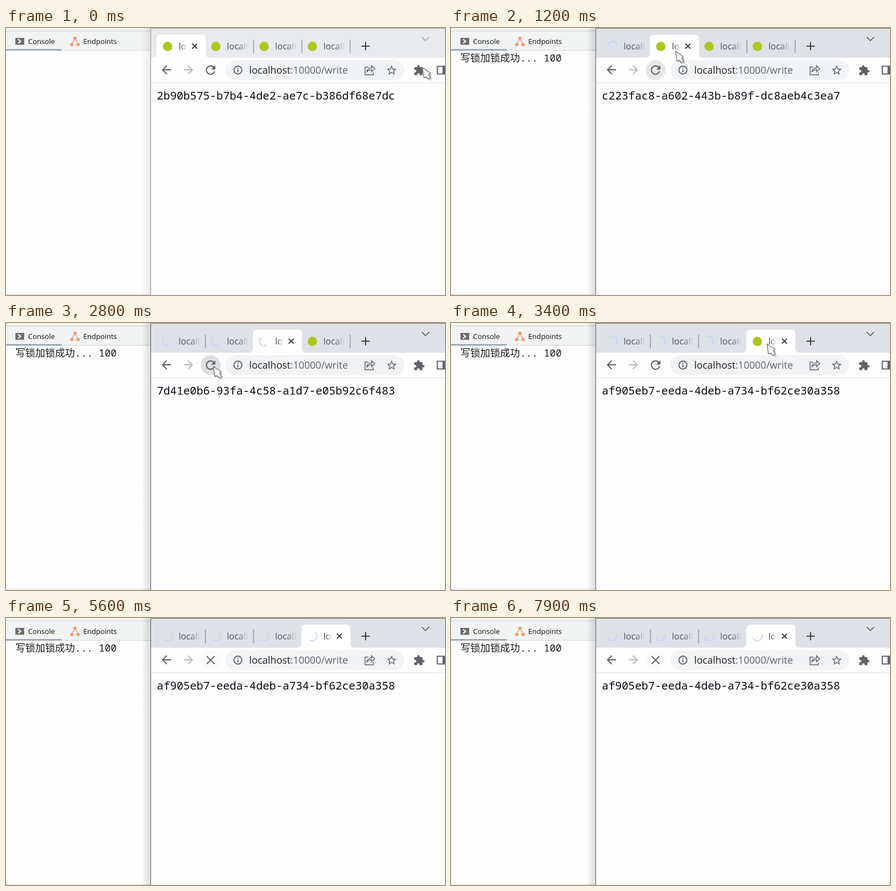
These frames come from a looping animation (796x485 px, 8000 ms). An HTML page:

```html
<!DOCTYPE html>
<html lang="en">
<head>
<meta charset="utf-8">
<style>
html, body { margin: 0; width: 100%; height: 100%; overflow: hidden; background: #fff; }
svg { display: block; width: 796px; height: 485px; }
text { white-space: pre; }
.ui { font: 13px "Open Sans", "Noto Sans", sans-serif; fill: #111; }
.log { font: 18px "Noto Sans Mono", "Noto Sans CJK SC", monospace; fill: #1a1a1a; }
.han { font: 300 18px "Noto Sans CJK SC", sans-serif; fill: #1a1a1a; }
.tab { font: 16px "Open Sans", "Noto Sans", sans-serif; }
.url { font: 17.85px "Open Sans", "Noto Sans", sans-serif; fill: #202124; }
.page { font: 20px "Noto Sans Mono", monospace; fill: #0b0b14; }
.line { fill: none; stroke: #5f6368; stroke-width: 2; }
.icon { fill: #5f6368; }
</style>
</head>
<body>
<svg viewBox="0 0 796 485">
  <defs>
    <linearGradient id="fadeLong" gradientUnits="userSpaceOnUse" x1="313" x2="352" y1="0" y2="0">
      <stop offset=".55" stop-color="#4f5358"/><stop offset="1" stop-color="#4f5358" stop-opacity="0"/>
    </linearGradient>
    <linearGradient id="fadeShort" gradientUnits="userSpaceOnUse" x1="313" x2="328" y1="0" y2="0">
      <stop offset=".3" stop-color="#3c4043"/><stop offset="1" stop-color="#3c4043" stop-opacity="0"/>
    </linearGradient>
    <linearGradient id="shade">
      <stop stop-color="#000" stop-opacity="0"/><stop offset="1" stop-color="#000" stop-opacity=".14"/>
    </linearGradient>
    <path id="back" d="M20 11H7.83l5.59-5.59L12 4l-8 8 8 8 1.41-1.41L7.83 13H20z"/>
  </defs>

  <!-- console pane -->
  <rect width="263" height="485" fill="#fefefe"/>
  <rect width="263" height="40" fill="#f2f4f4"/>
  <path d="M0 5.5H262M0 40.5H262M0 484.5H262" stroke="#cfd1d2"/>
  <rect y="38.5" width="101" height="2.5" fill="#929ca8"/>
  <rect x="17" y="18" width="16" height="12.5" fill="#6e6e6e"/>
  <path d="M22 20.5l4.5 3.8-4.5 3.8" fill="none" stroke="#fff" stroke-width="2"/>
  <text class="ui" x="40" y="29">Console</text>
  <path d="M119 29l6-10 6 10" fill="none" stroke="#f0a27c" stroke-width="1.6"/>
  <g fill="#f4976c"><circle cx="125" cy="18.5" r="3"/><circle cx="119.3" cy="30" r="3"/><circle cx="130.7" cy="30" r="3"/></g>
  <text class="ui" x="140" y="29">Endpoints</text>
  <g id="log"><text class="han" x="17" y="61">写锁加锁成功</text><text class="log" x="125" y="61">... 100</text></g>
  <rect id="shadow" x="246" width="16" height="485" fill="url(#shade)"/>

  <!-- browser window -->
  <rect x="263" width="533" height="485" fill="#fefefe"/>
  <rect id="strip" x="263" width="533" height="54"/>
  <path d="M263 99.5H796" stroke="#dcdee0"/>
  <path id="frame" d="M796 .5H262.5V485" fill="none"/>
  <path class="line" style="stroke:#3c4043" d="M644.5 33h15M652 25.5v15"/>
  <path id="chevron" d="M754 16.5l6.5 6.5 6.5-6.5" fill="none" stroke-width="1.2"/>
  <use href="#back" class="icon" transform="translate(278 63.2) scale(1.06)"/>
  <use href="#back" fill="#b8babd" transform="translate(343.500 63.2) scale(-1.06 1.06)"/>
  <rect x="398" y="58.5" width="324" height="36" rx="18" fill="#f1f3f4"/>
  <circle class="line" cx="420.500" cy="76.500" r="7.200"/>
  <path class="line" d="M420.500 75.500v5M420.500 72v2"/>
  <text class="url" x="441" y="83">localhost<tspan fill="#5f6368">:10000/write</tspan></text>
  <path class="line" style="stroke-width:1.5" d="M657 71h-6v14h15v-4M654 80.500c1-6 5-8 9-8v-4l5.500 5.500-5.500 5.500v-3.500c-4 0-7 1-9 4.500z"/>
  <path class="icon" transform="translate(688.500 66) scale(.9)" d="M22 9.240l-7.190-.62L12 2 9.190 8.630 2 9.240l5.460 4.730L5.820 21 12 17.270 18.180 21l-1.630-7.030zM12 15.400l-3.760 2.270 1-4.280-3.320-2.880 4.380-.38L12 6.100l1.710 4.040 4.380.38-3.320 2.880 1 4.280z"/>
  <path class="icon" transform="translate(738.500 66.500) scale(.88)" d="M20.500 11H19V7a2 2 0 0 0-2-2h-4V3.500a2.500 2.500 0 0 0-5 0V5H4a2 2 0 0 0-2 2v3.800h1.500a2.700 2.700 0 0 1 0 5.400H2V20a2 2 0 0 0 2 2h3.800v-1.500a2.700 2.700 0 0 1 5.400 0V22H17a2 2 0 0 0 2-2v-4h1.500a2.500 2.500 0 0 0 0-5z"/>
  <path class="line" d="M800 69.500H782v14h18"/>
  <rect class="icon" x="791.500" y="69" width="5" height="15"/>
  <circle id="halo" cx="371" cy="76.500" r="18"/>
  <path id="reload" class="icon" transform="translate(358 63.500) scale(1.08)" d="M17.650 6.350A7.960 7.960 0 0 0 12 4a8 8 0 1 0 7.730 10h-2.080A6 6 0 1 1 12 6c1.660 0 3.140.690 4.220 1.780L13 11h7V4z"/>
  <path id="stop" class="line" d="M364 69.500l14 14m0-14l-14 14"/>
  <g id="tabs"></g>
  <text id="page" class="page" x="273.500" y="130"></text>

  <g id="cursor">
    <path d="M2 3l15 10-2 3 3 5-4 3-5-4-5-1z" fill="#000" opacity=".18"/>
    <path d="M0 0l14.500 9.500-3 3 3.500 5.500-4 3-4-4-4.500 1z" fill="#f3f3f3" stroke="#777" stroke-width="1.400" stroke-linejoin="round"/>
  </g>
</svg>
<script>
const LOOP = 8000, STEP = 100, TAB_GAP = 87.5, SPIN = 1215;
const $ = id => document.getElementById(id);
const show = (id, on) => $(id).setAttribute('visibility', on ? 'visible' : 'hidden');
const paint = (id, attr, value) => $(id).setAttribute(attr, value);

const loadAt = [800, 1600, 2800, 4100];
const openAt = [0, 1200, 2400, 3200];
const ids = [
  '2b90b575-b7b4-4de2-ae7c-b386df68e7dc',
  'c223fac8-a602-443b-b89f-dc8aeb4c3ea7',
  '7d41e0b6-93fa-4c58-a1d7-e05b92c6f483',
  'af905eb7-eeda-4deb-a734-bf62ce30a358'
];

// time, x, y
const path = [
  [0, 755, 72], [100, 755, 72], [600, 376, 80], [1000, 374, 78], [1200, 407, 42],
  [1300, 407, 42], [1600, 374, 78], [1800, 374, 78], [2200, 467, 32], [2400, 467, 34],
  [2650, 376, 79], [2900, 376, 79], [3200, 560, 36], [3400, 573, 38], [3700, 573, 38],
  [4000, 378, 78], [4200, 382, 78], [4300, 383, 92], [4450, 386, 108]
];

function pointer(t) {
  const next = path.findIndex(p => p[0] > t);
  if (next < 0) return [-99, -99];
  if (next === 0) return path[0].slice(1);
  const [a, b] = [path[next - 1], path[next]];
  const k = (t - a[0]) / (b[0] - a[0]), ease = k * k * (3 - 2 * k);
  return [1, 2].map(i => a[i] + (b[i] - a[i]) * ease);
}

function nearReload(t) {
  const [x, y] = pointer(Math.max(0, t));
  return Math.hypot(x - 371, y - 76.5) < 18;
}

const tabShape = color =>
  `<path fill="${color}" d="M265 54q8 0 8-8V20q0-8 8-8h73q8 0 8 8v26q0 8 8 8z"/>`;

function tab(i, t, active, hover) {
  const open = i === active;
  const back = open ? tabShape('#fff') : i === hover ? tabShape('#eceef1') : '';
  const angle = 90 - 360 * (t - 4200) / SPIN;
  const badge = t >= loadAt[i]
    ? `<path d="M0-8.5A8.5 8.5 0 0 1 0 8.5" transform="translate(293 33) rotate(${angle})" fill="none" stroke="#c3d7fa" stroke-width="2"/>`
    : '<circle cx="293" cy="33.5" r="8.5" fill="#adc71d"/>';
  const close = open ? '<path class="line" style="stroke:#3c4043" d="M337.5 28.5l9 9m0-9l-9 9"/>' : '';
  const divider = [i, i + 1].some(n => n === active || n === hover)
    ? '' : '<path d="M361.500 21v25" stroke="#80868b" stroke-width="1.200"/>';
  return `<g transform="translate(${i * TAB_GAP})">${back}${badge}
    <text class="tab" x="313" y="39" fill="url(#${open ? 'fadeShort' : 'fadeLong'})">${open ? 'loc' : 'localh'}</text>
    ${close}${divider}</g>`;
}

function draw(t) {
  const [x, y] = pointer(t);
  const active = openAt.filter(at => t >= at).length - 1;
  const hover = y > 11 && y < 54 ? Math.floor((x - 273) / TAB_GAP) : -1;
  const focused = t >= 700;
  const stopping = t >= loadAt[active] + 500;

  paint('strip', 'fill', focused ? '#dee1e6' : '#e8eaed');
  paint('frame', 'stroke', focused ? '#5c5e61' : '#929497');
  paint('chevron', 'stroke', focused ? '#333' : '#96999d');
  paint('shadow', 'opacity', focused ? 1 : .6);
  paint('halo', 'fill', nearReload(t) ? '#dcdee0' : nearReload(t - 200) ? '#e6e7e9' : stopping ? '#fafafa' : '#fefefe');
  show('log', t >= 1000);
  show('reload', !stopping);
  show('stop', stopping);
  $('page').textContent = ids[active];
  // The open tab goes last so that its feet lie on top.
  $('tabs').innerHTML = [0, 1, 2, 3].sort((a, b) => (a === active) - (b === active))
    .map(i => tab(i, t, active, hover)).join('');
  paint('cursor', 'transform', `translate(${x} ${y})`);
}

const start = performance.now();
let last = -1;
function tick() {
  const t = Math.floor((performance.now() - start) % LOOP / STEP) * STEP;
  if (t !== last) draw(last = t);
  requestAnimationFrame(tick);
}
tick();
</script>
</body>
</html>
```
